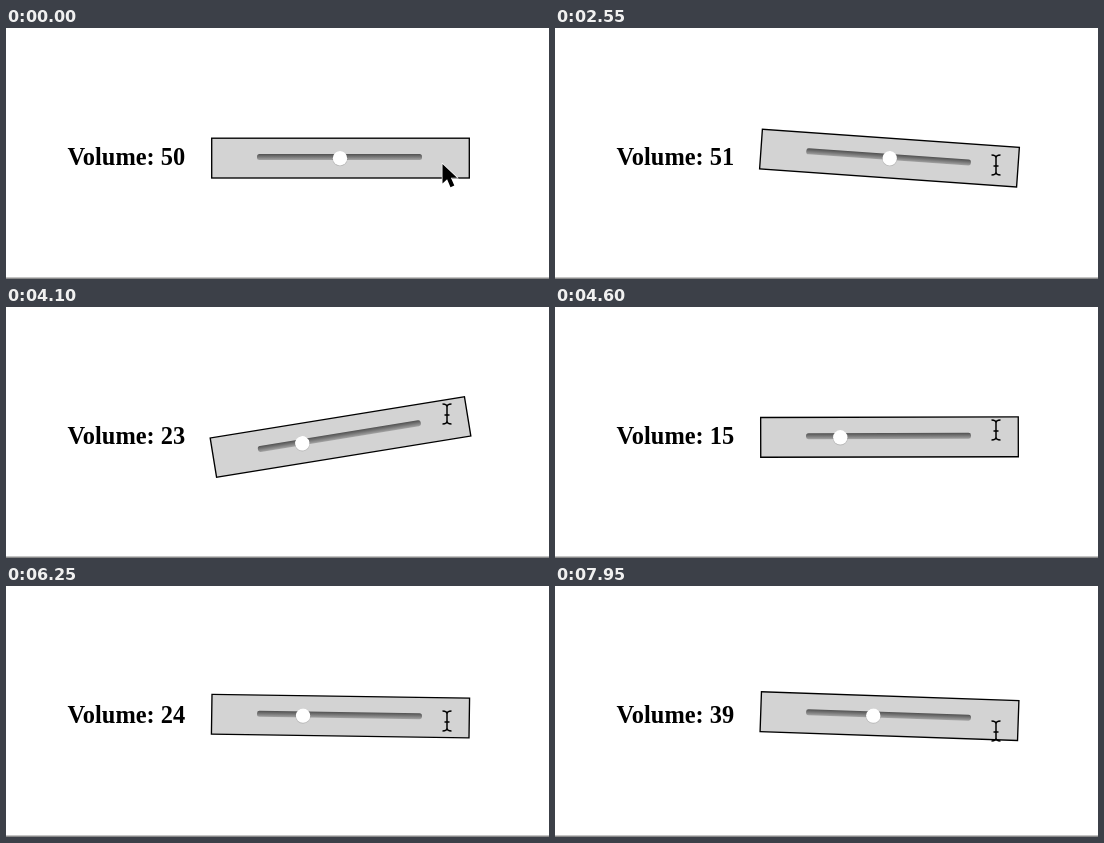
These frames come from a looping animation (543x251 px, 8 s). An HTML page:

```html
<!DOCTYPE html>
<html lang="en">
<head>
<meta charset="utf-8">
<title>Tilting volume slider</title>
<style>
  html, body { margin: 0; width: 100%; height: 100%; overflow: hidden; background: #fff; }
  svg { display: block; }
  text { font: bold 24.4px "Liberation Serif", serif; }
</style>
</head>
<body>
<svg width="543" height="251" viewBox="0 0 543 251">
  <defs>
    <linearGradient id="groove" x1="0" y1="0" x2="0" y2="1">
      <stop offset="0" stop-color="#505050"/>
      <stop offset="1" stop-color="#a3a3a3"/>
    </linearGradient>
  </defs>
  <rect y="249.5" width="543" height="1.5" fill="#8a8a8a"/>
  <text id="label" x="61.5" y="137.3"></text>

  <g id="panel">
    <rect x="-128.3" y="-19.8" width="257.6" height="39.8" fill="#d3d3d3" stroke="#000" stroke-width="1.35"/>
    <rect x="-83" y="-4" width="165" height="6" rx="2.5" fill="url(#groove)"/>
    <g id="knob">
      <circle cy=".5" r="7.6" fill="#000" opacity=".12"/>
      <circle r="7.2" fill="#fff"/>
    </g>
  </g>

  <path id="arrow" d="M0 0V19.5L4.6 15.2L8 23.2L11.8 21.6L8.4 13.8H14.6Z"
        stroke="#fff" stroke-width="1.4" paint-order="stroke"/>
  <path id="beam" d="M-4.5-10Q0-10 0-7Q0-10 4.5-10M0-7V7M-4.5 10Q0 10 0 7Q0 10 4.5 10M-2.5 1H2.5"
        fill="none" stroke="#000" stroke-width="1.5"/>
</svg>
<script>
const LOOP = 8000, STEP = 50, ROLL_DELAY = 60, START_VOLUME = 50;
const [label, panel, knob, arrow, beam] =
  ["label", "panel", "knob", "arrow", "beam"].map(id => document.getElementById(id));

// The panel tips over and back; the knob rolls along with it
const swings = [
  { start: 2370, end: 3295, tilt: 12.2, rollEnd: 3295, roll: 31 },
  { start: 3200, end: 4650, tilt: -10.7, rollEnd: 4419, roll: -66 },
  { start: 5640, end: 6360, tilt: 3.9, rollEnd: 6360, roll: 9 },
  { start: 6740, end: 7480, tilt: 6.15, rollEnd: 7214, roll: 15 },
  { start: 7860, end: 8560, tilt: 12.9, rollEnd: 8560, roll: 30 },
];
// Resting heights of the pointer: [ms, y]
const pointer = [[0, 136], [1100, 137], [1450, 164], [1750, 164], [2050, 133], [2550, 137],
  [3150, 125], [4100, 107], [4850, 127], [5650, 133], [7000, 138], [7950, 145]];

const progress = (t, a, b) => Math.min(1, Math.max(0, (t - a) / (b - a)));
const bump = p => Math.sin(Math.PI * p) ** 2;
const glide = p => p - Math.sin(2 * Math.PI * p) / (2 * Math.PI);
const total = part => swings.reduce((sum, swing) => sum + part(swing), 0);

const tiltAt = t => total(s => s.tilt * bump(progress(t, s.start, s.end)));
const volumeAt = t => START_VOLUME +
  total(s => s.roll * glide(progress(t, s.start + ROLL_DELAY, s.rollEnd)));
const pointerAt = t => pointer.reduce((y, [time, next], i) =>
  i ? y + (next - pointer[i - 1][1]) * glide(progress(t, pointer[i - 1][0], time)) : next, 0);

const place = (node, x, y, angle = 0) =>
  node.setAttribute("transform", `translate(${x} ${y}) rotate(${angle})`);

function draw(now) {
  const t = Math.floor(now % LOOP / STEP) * STEP;
  const volume = volumeAt(t), y = pointerAt(t);
  const offset = volume - START_VOLUME;
  const showArrow = t < 150 || y > 152;

  label.textContent = `Volume: ${Math.round(volume)}`;
  place(panel, 334, 130, tiltAt(t));
  place(knob, offset * (1.45 + offset / 600), .2);
  place(arrow, 436.5, t < 150 ? y : y - 12);
  place(beam, 441, y);
  arrow.style.display = showArrow ? "" : "none";
  beam.style.display = showArrow ? "none" : "";
  requestAnimationFrame(draw);
}
requestAnimationFrame(draw);
</script>
</body>
</html>
```
